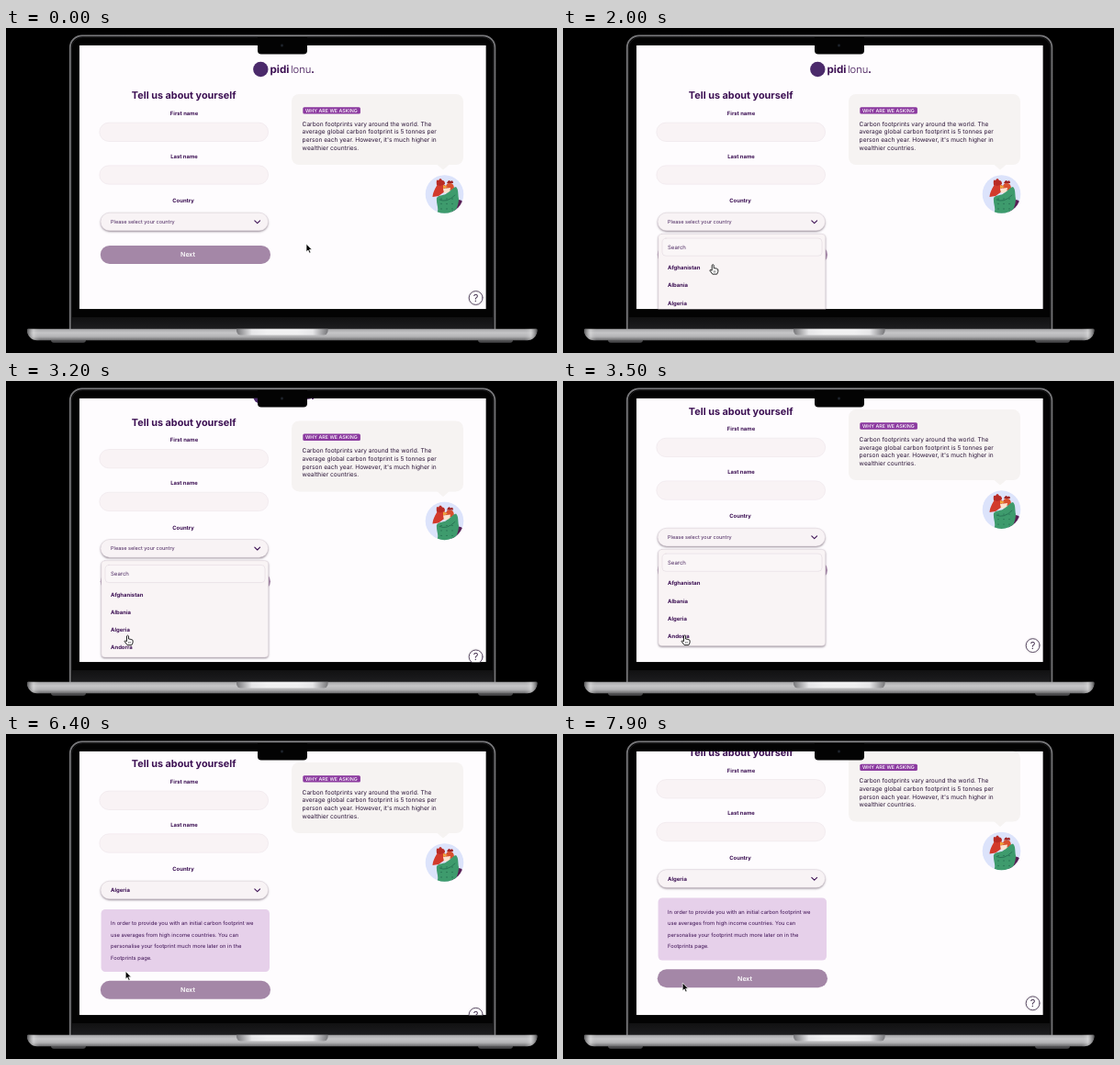
Recreate the animation shown at these times as an HTML page with a canvas. Size 600 by 354 pixels, loop 8 s.

```html
<!DOCTYPE html>
<html lang="en">
<head>
<meta charset="utf-8">
<title>Tell us about yourself</title>
<style>
  html, body { margin: 0; width: 100%; height: 100%; overflow: hidden; background: #000; }
  canvas { display: block; width: 600px; height: 354px; }
</style>
</head>
<body>
<canvas id="stage"></canvas>
<script>
const W = 600, H = 354, LOOP = 8000, STEP = 100;
const SCREEN = { x: 79.8, y: 18.8, w: 443, h: 287.4 };
const INK = '#3c1053', BODY = '#2c1639', SOFT = '#4b2760', FIELD = '#f9f3f5';
const OPEN_AT = 900, PICK_AT = 5000;

const canvas = document.getElementById('stage');
const ctx = canvas.getContext('2d');
const dpr = window.devicePixelRatio || 1;
canvas.width = W * dpr;
canvas.height = H * dpr;
ctx.scale(dpr, dpr);
ctx.textRendering = 'geometricPrecision';

const easeOut = p => 1 - (1 - p) * (1 - p);
const easeInOut = p => (1 - Math.cos(Math.PI * p)) / 2;

// Eased 0..1 progress of t between two times
function progress(t, from, to, ease) {
  return ease(Math.min(1, Math.max(0, (t - from) / (to - from))));
}

function box(x, y, w, h, r, fill, stroke, width = 0.6) {
  ctx.beginPath();
  ctx.roundRect(x, y, w, h, r);
  if (fill) { ctx.fillStyle = fill; ctx.fill(); }
  if (stroke) { ctx.strokeStyle = stroke; ctx.lineWidth = width; ctx.stroke(); }
}

function raised(x, y, w, h, r, fill) {
  ctx.save();
  ctx.shadowColor = 'rgba(60, 40, 60, 0.55)';
  ctx.shadowBlur = 2.2 * dpr;
  ctx.shadowOffsetY = 1.1 * dpr;
  box(x, y, w, h, r, fill);
  ctx.restore();
  box(x, y, w, h, r, null, '#d9ced6', 0.5);
}

function disc(x, y, r, fill) {
  ctx.beginPath();
  ctx.arc(x, y, r, 0, Math.PI * 2);
  ctx.fillStyle = fill;
  ctx.fill();
}

function shape(d, fill, stroke, width) {
  const path = new Path2D(d);
  if (fill) { ctx.fillStyle = fill; ctx.fill(path); }
  if (stroke) { ctx.strokeStyle = stroke; ctx.lineWidth = width; ctx.stroke(path); }
}

// y is the visual middle of the line
function text(str, x, y, size, weight = 400, color = INK, align = 'left') {
  ctx.font = `${weight} ${size}px Inter, "Open Sans", sans-serif`;
  ctx.textAlign = align;
  ctx.fillStyle = color;
  ctx.fillText(str, x, y + size * 0.34);
}

function gradient(x0, y0, x1, y1, ...colors) {
  const g = ctx.createLinearGradient(x0, y0, x1, y1);
  colors.forEach((c, i) => g.addColorStop(i / (colors.length - 1), c));
  return g;
}

function drawLogo() {
  disc(277.3, 45, 8.2, '#4b2a6b');
  text('pidi', 287.5, 45, 11.6, 700);
  text('lonu', 310, 45, 11.2, 300);
  text('.', 332, 45, 12, 700);
}

function drawBirds() {
  ctx.save();
  ctx.beginPath();
  ctx.arc(477.5, 181, 20.8, 0, Math.PI * 2);
  ctx.clip();
  ctx.fillStyle = '#dce3fb';
  ctx.fillRect(456, 160, 43, 43);
  shape('M486 190Q494 184 498 190L494 200L485 203Z', '#5a1f55');
  shape('M464.5 184C465 178 468 174 470 170L475 169L479 172L478 178L471 183Z', '#d23a2c');
  shape('M469 171Q468 164 471 166Q473 162 475 166Q478 166 478 170L473 172Z', '#b92b25');
  shape('M479 178C478 172 480 168 484 169Q488 169 488 176Z', '#d8502f');
  shape('M480 169Q482 164 484 167Q487 165 487 169Z', '#9f2525');
  shape('M476 171L481 173L476 175Z', '#f0a63c');
  shape('M476 175L484 174L483 179L477 180Z', '#fbe3cf');
  shape('M469 185C472 181 477 183 480 180C484 178 486 174 490 173C493 176 492 181 493 186C493 193 490 197 489 203H468C473 198 468 192 469 185Z', '#3e9b6d');
  shape('M472 187Q480 191 489 182', null, '#246b50', 0.8);
  for (let i = 0; i < 9; i++) {
    disc(474 + (i % 3) * 6, 186 + Math.floor(i / 3) * 5.5, 0.7, '#226a4e');
  }
  ctx.restore();
}

function drawCard() {
  box(311, 72, 187, 77, 8, '#f6f3f2');
  shape('M469 148.5H483L476 154.5Z', '#f6f3f2');
  box(323.3, 86.2, 62.6, 7.4, 1.5, '#8b399f');
  text('WHY ARE WE ASKING', 326, 89.9, 5.35, 500, '#fff');
  [
    'Carbon footprints vary around the world. The',
    'average global carbon footprint is 5 tonnes per',
    "person each year. However, it's much higher in",
    'wealthier countries.'
  ].forEach((line, i) => text(line, 322.6, 104.5 + i * 8.7, 6.6, 400, BODY));
  drawBirds();
}

function drawInput(label, y) {
  text(label, 194, y, 5.9, 700, INK, 'center');
  box(101.8, y + 10.1, 183.8, 20.4, 10.2, FIELD, '#ede4ea');
}

function drawSelect(picked) {
  text('Country', 193, 188.2, 5.95, 700, INK, 'center');
  raised(103, 201.2, 182.5, 19.6, 9.8, '#f8f3f5');
  if (picked) text('Algeria', 114, 211, 5.95, 700);
  else text('Please select your country', 114, 211, 5.55, 400, SOFT);
  ctx.lineCap = ctx.lineJoin = 'round';
  shape('M270.8 209.8L273.7 212.6L276.6 209.8', null, INK, 1.1);
}

function drawNext(y) {
  box(102.8, y, 185.2, 20, 10, '#a487a7');
  text('Next', 198, y + 10, 7, 600, '#fff', 'center');
}

function drawDropdown() {
  raised(103.8, 224.3, 182, 105.2, 4, '#f9f4f5');
  box(108, 229, 174, 19.2, 4, '#faf6f7', '#ddd2da', 0.5);
  text('Search', 114, 239, 6, 400, SOFT);
  ['Afghanistan', 'Albania', 'Algeria', 'Andorra']
    .forEach((name, i) => text(name, 114, 261.3 + i * 19.1, 5.95, 700));
}

function drawNotice() {
  box(103.6, 232, 183.4, 68, 4.5, '#e6d0ea');
  [
    'In order to provide you with an initial carbon footprint we',
    'use averages from high income countries. You can',
    'personalise your footprint much more later on in the',
    'Footprints page.'
  ].forEach((line, i) => text(line, 114, 247.3 + i * 12.45, 5.82, 400));
}

function drawHelp(y) {
  ctx.save();
  ctx.shadowColor = 'rgba(0, 0, 0, 0.3)';
  ctx.shadowBlur = 2 * dpr;
  disc(511.6, y, 7.6, '#fff');
  ctx.restore();
  ctx.beginPath();
  ctx.arc(511.6, y, 7.4, 0, Math.PI * 2);
  ctx.strokeStyle = '#43304f';
  ctx.lineWidth = 0.85;
  ctx.stroke();
  text('?', 511.6, y, 11, 400, '#43304f', 'center');
}

function drawPage(t) {
  const open = t >= OPEN_AT && t < PICK_AT;
  const picked = t >= PICK_AT;
  const scroll = 41 * progress(t, 2930, 3530, easeOut)
               + 12.5 * progress(t, 6640, 7450, easeOut);
  ctx.save();
  ctx.beginPath();
  ctx.rect(SCREEN.x, SCREEN.y, SCREEN.w, SCREEN.h);
  ctx.clip();
  ctx.fillStyle = '#fefcfe';
  ctx.fillRect(SCREEN.x, SCREEN.y, SCREEN.w, SCREEN.h);
  ctx.translate(0, -scroll);
  drawLogo();
  text('Tell us about yourself', 193.7, 73.8, 10.85, 700, INK, 'center');
  drawInput('First name', 93);
  drawInput('Last name', 139.7);
  drawSelect(picked);
  drawCard();
  if (picked) drawNotice();
  drawNext(picked ? 309.8 : 236.9);
  if (open) drawDropdown();
  drawHelp(picked ? 346.8 : open ? 329 : 294);
  ctx.restore();
}

function drawLaptop() {
  ctx.fillStyle = '#000';
  ctx.fillRect(0, 0, W, H);
  box(69.8, 8.4, 462.6, 334, [13, 13, 0, 0], '#030303', gradient(69, 0, 533, 0, '#77777a', '#8b8b8e', '#77777a'), 1.8);
  box(71.6, 10.2, 459, 320, [11.5, 11.5, 0, 0], null, '#1d1d1f', 0.8);
  ctx.fillStyle = gradient(0, 315, 0, 328, '#111112', '#1d1d1f');
  ctx.fillRect(72, 315, 458, 13);
}

function drawFront() {
  box(274, 10, 54, 18.5, [0, 0, 4, 4], '#030303');
  disc(300.5, 19, 1.8, '#15171c');
  disc(300.5, 19, 0.8, '#27303d');

  ctx.fillStyle = '#000';
  ctx.fillRect(0, 328, W, 26);
  for (const x of [49, 514]) box(x, 339, 38, 3.8, [0, 0, 3, 3], '#4a4a4c');
  box(23, 327.8, 555.4, 12.4, [1, 1, 11, 11], gradient(0, 327.8, 0, 340.2, '#a2a2a4', '#c6c6c8', '#b4b4b6', '#68686a'));
  const edge = ['rgba(40,40,42,.7)', 'rgba(235,235,235,.4)', 'rgba(180,180,182,0)'];
  box(23, 327.8, 14, 12.4, [1, 0, 0, 11], gradient(23, 0, 37, 0, ...edge));
  box(564.4, 327.8, 14, 12.4, [0, 1, 11, 0], gradient(578.4, 0, 564.4, 0, ...edge));
  box(251, 327.8, 99.6, 6.8, [0, 0, 5, 5], gradient(251, 0, 350.6, 0, '#77777a', '#e6e6e8', '#f0f0f1', '#f0f0f1', '#f0f0f1', '#e6e6e8', '#77777a'));
}

function drawCursor(t) {
  const open = progress(t, 350, 620, easeInOut);
  const list = progress(t, 1100, 2500, easeInOut);
  const rise = progress(t, 3600, 4400, easeInOut);
  const rest = progress(t, 5000, 6000, easeOut);
  const drop = progress(t, 7450, 7850, easeInOut);
  const x = 327 - 86 * open - 108.5 * list - 2.3 * rest;
  const y = 235.2 - 27 * open + 68.8 * list - 18.1 * rise - 0.5 * rest + 12.6 * drop;
  const hand = t < PICK_AT && list > 0.25;
  ctx.save();
  ctx.translate(x, y);
  ctx.lineJoin = 'round';
  if (hand) {
    shape('M-1 .8Q0-.6 1 .8V4L2.6 4.2L4.4 4.7L5.6 5.4V8L4.4 10.6H-.4L-3.4 6.6Q-3.6 5.2-1 6.6Z', '#fff', '#111', 0.9);
    shape('M1.2 6.8V8.9M2.7 6.8V8.9', null, '#111', 0.5);
  } else {
    shape('M0 0V8.6L2 6.8L3.4 10L4.9 9.3L3.5 6.3H6.2Z', '#000', '#fff', 0.7);
  }
  ctx.restore();
}

function render(now) {
  const t = Math.floor((now % LOOP) / STEP) * STEP;
  drawLaptop();
  drawPage(t);
  drawFront();
  drawCursor(t);
}

const start = performance.now();
function tick() {
  render(performance.now() - start);
  requestAnimationFrame(tick);
}
tick();
</script>
</body>
</html>
```
